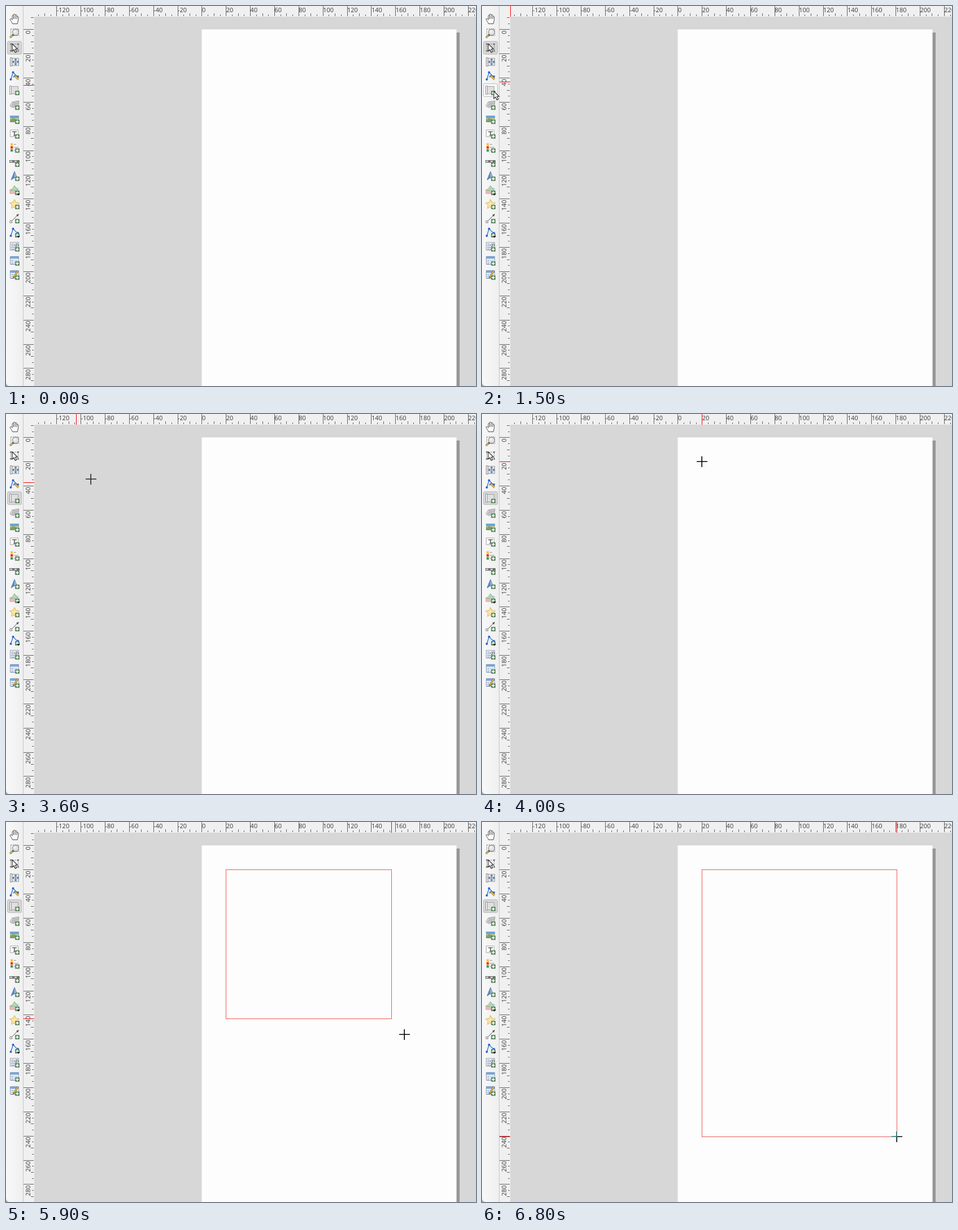
Write an HTML page with a canvas that moves like this. It is 832 px wide and 673 px high and loops after 8 s.

```html
<!DOCTYPE html>
<html lang="en">
<head>
<meta charset="utf-8">
<title>Drawing a layout frame</title>
<style>
html, body { margin: 0; width: 100%; height: 100%; overflow: hidden; background: #d7d7d7; }
canvas { display: block; }
</style>
</head>
<body>
<canvas id="stage" width="832" height="673"></canvas>
<script>
const ctx = document.getElementById('stage').getContext('2d');
const LOOP = 8000, STEP = 100, LAG = 35;
const RED = '#f00', DARK = '#444', GREY = '#9a9a9a', BLUE = '#3c78c8';
const PRESSED = ['#d6d6d6', '#bcbcbc'], HOVER = ['#f8f8f8', '#bcbcbc'];
const ORIGIN = { x: 346.9, y: 41.9 }, MM = 450 / 210;
const START = [389, 84];

// pointer path: time, x, y
const PATH = [
  [600, 680, 141], [700, 560, 133], [800, 420, 127], [900, 290, 124], [1000, 190, 125],
  [1100, 120, 128], [1200, 75, 131], [1300, 45, 138], [1400, 24, 151], [1500, 21, 151],
  [3300, 21, 151], [3400, 32, 147], [3500, 75, 133], [3600, 150, 115], [3700, 240, 100],
  [3800, 320, 90], [3900, 381, 85], [3965, 389, 84],
  [5400, 389, 84], [5500, 415, 104], [5600, 478, 157], [5700, 565, 242], [5800, 633, 297],
  [5865, 682, 348], [5900, 705, 376], [6000, 740, 420], [6100, 758, 450], [6200, 762, 476],
  [6265, 761, 494], [6300, 754, 506], [6400, 748, 526], [6500, 743, 541], [6600, 738, 551],
  [6765, 734, 557]
];

function pointer(t) {
  const i = PATH.findIndex(k => k[0] > t);
  if (i === 0) return PATH[0].slice(1);
  if (i < 0) return PATH[PATH.length - 1].slice(1);
  const [a, b] = [PATH[i - 1], PATH[i]], f = (t - a[0]) / (b[0] - a[0]);
  return [a[1] + (b[1] - a[1]) * f, a[2] + (b[2] - a[2]) * f];
}

// the rulers follow slightly late and only inside the canvas area
function marker(t) {
  const p = pointer(t - LAG);
  return p[0] < 50 ? [50, 134] : p.map(Math.round);
}

function rect(x, y, w, h, color) {
  ctx.fillStyle = color;
  ctx.fillRect(x, y, w, h);
}

function shape(d, fill, stroke, width = 1) {
  const p = new Path2D(d);
  if (fill) { ctx.fillStyle = fill; ctx.fill(p); }
  if (stroke) { ctx.strokeStyle = stroke; ctx.lineWidth = width; ctx.stroke(p); }
}

function dot(x, y, r, color) {
  ctx.fillStyle = color;
  ctx.beginPath();
  ctx.arc(x, y, r, 0, 7);
  ctx.fill();
}

function at(x, y, draw) {
  ctx.save();
  ctx.translate(x, y);
  draw();
  ctx.restore();
}

function button(y, [fill, border]) {
  ctx.beginPath();
  ctx.roundRect(2.5, y - 11.5, 25, 23, 2.5);
  ctx.fillStyle = fill;
  ctx.fill();
  ctx.strokeStyle = border;
  ctx.lineWidth = 1;
  ctx.stroke();
}

function badge() {
  ctx.beginPath();
  ctx.roundRect(1, 1, 8, 8, 1.5);
  ctx.fillStyle = '#608862';
  ctx.fill();
  rect(2.3, 4.2, 5.4, 1.6, '#fff');
  rect(4.2, 2.3, 1.6, 5.4, '#fff');
}

const arrow = () => shape('M0 0V13L3 10.2L5.2 15.2L7.7 14.1L5.5 9.3H9.4Z', '#fff', '#222', 1.1);
const menu = () => shape('M4 6H10L7 9.5Z', '#222');
const pencil = () => {
  shape('M-1 4L6 -7', null, '#7a5a20', 3.2);
  shape('M-1 4L6 -7', null, '#f0b840', 2);
  shape('M-2.4 6L-2.2 3L.4 4.4Z', DARK);
};

// inverts what lies below it
function cross() {
  ctx.globalCompositeOperation = 'difference';
  shape('M-9 .2H10M.2 -9V10', null, '#fff', 1.6);
}

function dashedBox(x, y, w, h) {
  ctx.setLineDash([2, 1.5]);
  ctx.strokeStyle = '#777';
  ctx.lineWidth = 1;
  ctx.strokeRect(x, y, w, h);
  ctx.setLineDash([]);
}

function nodes() {
  shape('M-6.5 6L-2.5 -6.5L6 2Z', '#eaf0f8');
  shape('M-6.5 6L-2.5 -6.5L6 2', null, BLUE, 1.4);
  for (const [x, y] of [[-6.5, 6], [-2.5, -6.5], [6, 1]]) dot(x, y, 2, '#2468d0');
}

function table() {
  shape('M-7.5 -7.5H7.5V6.5H-7.5Z', '#eef3f9', '#8aa2be');
  rect(-7, -7, 14, 3.5, '#78a6d8');
  for (const y of [-1, 2, 5]) {
    rect(-6, y, 4, 1, '#7f98b5');
    rect(-1, y, 7, 1, '#a9bdd2');
  }
}

const ICONS = [
  [23, 0, () => shape('M-3.5 8.5C-4.5 5.5 -6.5 3.5 -8 .5C-7 -1.5 -5 -.5 -3.8 1.5V-5.5C-3.8 -7.5 -1.8 -7.5 -1.5 -5.5V-7.5C-1.2 -9.3 1 -9.3 1.2 -7.5V-6.5C2 -8.3 4 -7.8 4 -6V-4C5 -5.5 6.8 -4.8 6.8 -3C6.8 2 6.3 5 5 8.5ZM-1.5 -5.5V0M1.2 -6.5V0M4 -4V0', '#fff', DARK)],
  [48, 0, () => {
    dashedBox(-6.5, -7.5, 14, 12);
    shape('M-1.5 2.5L-8 8', null, '#555', 3.2);
    shape('M-3.5 4.3L-8 8', null, '#e5c24c', 2);
    dot(2, -1.5, 6, '#777');
    dot(2, -1.5, 5.1, '#e2e2e2');
    dot(.8, -3, 2.3, '#f2f2f2');
  }],
  [74, 0, () => {
    dashedBox(-6.5, -6.5, 13, 12);
    for (const x of [-8, 5]) for (const y of [-8, 4]) rect(x, y, 3, 3, '#888');
    at(-4, -7, arrow);
  }],
  [99, 0, () => {
    shape('M-4.5 -6.5H7.5V6.5H-4.5Z', '#e0e4ea', GREY);
    shape('M-7.5 -7.5H-4.5V7.5H-7.5Z', '#eee', '#888');
    shape('M2 -6L4.5 -3H-.5ZM2 6L4.5 3H-.5ZM-4 0L-1 -2.5V2.5ZM8 0L5 -2.5V2.5Z', '#456f9f');
    shape('M2 -3V3M-1 0H5', null, '#6f92bb', 1.5);
  }],
  [124, 0, () => {
    nodes();
    shape('M0 -1L7 6', null, '#8a6a20', 3.4);
    shape('M0 -1L7 6', null, '#f2c14e', 2.2);
    shape('M-2 2L2 -2', null, '#777', 1.8);
  }],
  [149, 1, () => {
    shape('M-5.5 -6.5H6.5V6.5H-5.5Z', '#e0e0e0', '#a2a2a2');
    shape('M-8.5 -7.5H-5.5V7.5H-8.5Z', '#eee', '#989898');
  }],
  [175, 1, () => {
    shape('M-8 2L-4 -5L8 -7L7 1L-2 5Z', '#c6c6c6', '#a0a0a0');
    shape('M-8 2L-4 -5L-2 -4L-6 4Z', '#ddd', '#a5a5a5', .7);
    shape('M-4 0L7 -3M0 -5L1 3', null, '#adadad', .8);
  }],
  [200, 1, () => {
    rect(-8, -6, 16, 12, '#9dabb2');
    rect(-7.5, -5.5, 15, 6, '#62a9e0');
    rect(-7.5, -1, 15, 3, '#efcf6b');
    shape('M-7.5 1L-2 -1L7.5 2V5.5H-7.5Z', '#829f55');
  }],
  [226, 1, () => {
    shape('M-7.5 -6.5H6.5V5.5H-7.5Z', '#fafafa', '#aaa');
    rect(-4, -4, 8, 1.3, '#555');
    rect(-.8, -4, 1.5, 7.5, '#555');
    rect(-2.2, 3, 4.4, 1, '#555');
  }],
  [251, 1, () => ['#f5c52b', '#e4372c', '#3f9d50'].forEach((c, i) => {
    rect(-7, -8 + i * 5.3, 4.3, 4.3, c);
    rect(-1, -6.5 + i * 5.3, i ? 8 : 4, 1.3, '#a5a5a5');
  })],
  [276, 1, () => {
    rect(-9, -3, 18, 4.5, '#707070');
    for (const x of [-8, 0]) rect(x, -1.7, 4, 1.8, '#e8e8e8');
  }],
  [301, 1, () => {
    shape('M0 -8L6 7L0 3L-6 7Z', '#a9c3e3', '#4a6f9c', .9);
    shape('M0 -8V3L-6 7Z', '#5c89be');
  }],
  [326, 1, () => {
    shape('M-8 -1H2V6H-8Z', '#efbcbc', '#c48c8c', .8);
    dot(4, 0, 4.5, '#c2d1e3');
    shape('M0 -8L6 1H-6Z', '#b2dab3', '#7bae7e', .8);
  }, menu],
  [351, 1, () => shape('M0 -8.5L2.6 -3L8.5 -2.3L4.2 1.7L5.3 7.5L0 4.7L-5.3 7.5L-4.2 1.7L-8.5 -2.3L-2.6 -3Z', '#fae6a6', '#d8b65c')],
  [376, 1, () => {
    shape('M-6 6L6 -6', null, '#555');
    shape('M8 -8L3 -6L6 -3Z', '#555');
    shape('M-8 4.5H-4.5V8H-8Z', '#fff', '#777');
  }],
  [401, 1, nodes, menu],
  [426, 1, () => {
    shape('M-7.5 -7.5H7.5V6.5H-7.5Z', '#f2f5f8', '#94a2b0');
    for (const y of [-5, -2, 1, 4]) rect(-6, y, y < 0 ? 5 : 9, 1.2, '#7f9ab8');
    shape('M2 -5L0 -2.5L2 0M5 -5L7 -2.5L5 0M4.2 -6L2.8 1', null, '#444', 1);
  }],
  [451, 1, table],
  [476, 1, () => { table(); pencil(); }]
];

function toolbar(t) {
  const fill = ctx.createLinearGradient(0, 0, 30, 0);
  fill.addColorStop(0, '#f8f8f8');
  fill.addColorStop(1, '#efefef');
  rect(0, 0, 30, 673, fill);
  rect(30, 0, 1, 673, '#c6c6c6');
  shape('M0 667Q1 672 6 673H0Z', '#b4b4b4');
  if (t < 3100) button(74, PRESSED);
  if (t >= 3000) button(149, PRESSED);
  else if (t >= 1400) button(149, HOVER);
  for (const [y, add, draw, extra] of ICONS) at(15, y, () => {
    draw();
    if (add) badge();
    if (extra) extra();
  });
}

const tickSize = mm => mm % 20 === 0 ? 19 : mm % 10 === 0 ? 6 : 4;

function rulers() {
  rect(31, 0, 801, 19, '#f0f0f0');
  rect(31, 0, 19, 673, '#f0f0f0');
  ctx.font = '11px "Open Sans", "Noto Sans", sans-serif';
  for (let mm = -135; mm <= 225; mm += 5) {
    const x = ORIGIN.x + mm * MM, n = tickSize(mm);
    rect(Math.floor(x), 19 - n, 1, n - 1, '#606060');
    if (n < 19) continue;
    ctx.fillStyle = '#3a3a3a';
    ctx.textAlign = 'left';
    ctx.fillText(mm, x, 11);
  }
  for (let mm = -10; mm <= 290; mm += 5) {
    const y = ORIGIN.y + mm * MM, n = tickSize(mm);
    rect(50 - n, Math.floor(y), n - 1, 1, '#606060');
    if (n < 19) continue;
    at(43, y + 1.6, () => {
      ctx.rotate(-Math.PI / 2);
      ctx.fillStyle = '#3a3a3a';
      ctx.textAlign = 'right';
      ctx.fillText(mm, 0, 0);
    });
  }
}

function render(t) {
  rect(0, 0, 832, 673, '#d7d7d7');
  rect(797, 47, 6, 626, '#969696');
  rect(346.5, 41.5, 451, 632, '#fdfdfd');
  rulers();
  toolbar(t);

  const [mx, my] = marker(t), [x, y] = pointer(t);
  rect(31, t < 600 ? 140 : my, 19, 1, RED);
  if (t < 600) return;
  rect(mx, 0, 1, 19, RED);
  if (t >= 5500) {
    ctx.strokeStyle = '#ec5a56';
    ctx.lineWidth = 1;
    ctx.strokeRect(START[0] + .5, START[1] + .5, mx - START[0], my - START[1]);
  }
  at(Math.round(x), Math.round(y), t < 3400 || x < 50 ? arrow : cross);
}

function tick() {
  const t = performance.now() % LOOP;
  render(Math.floor(t / STEP) * STEP);
  requestAnimationFrame(tick);
}
tick();
</script>
</body>
</html>
```
